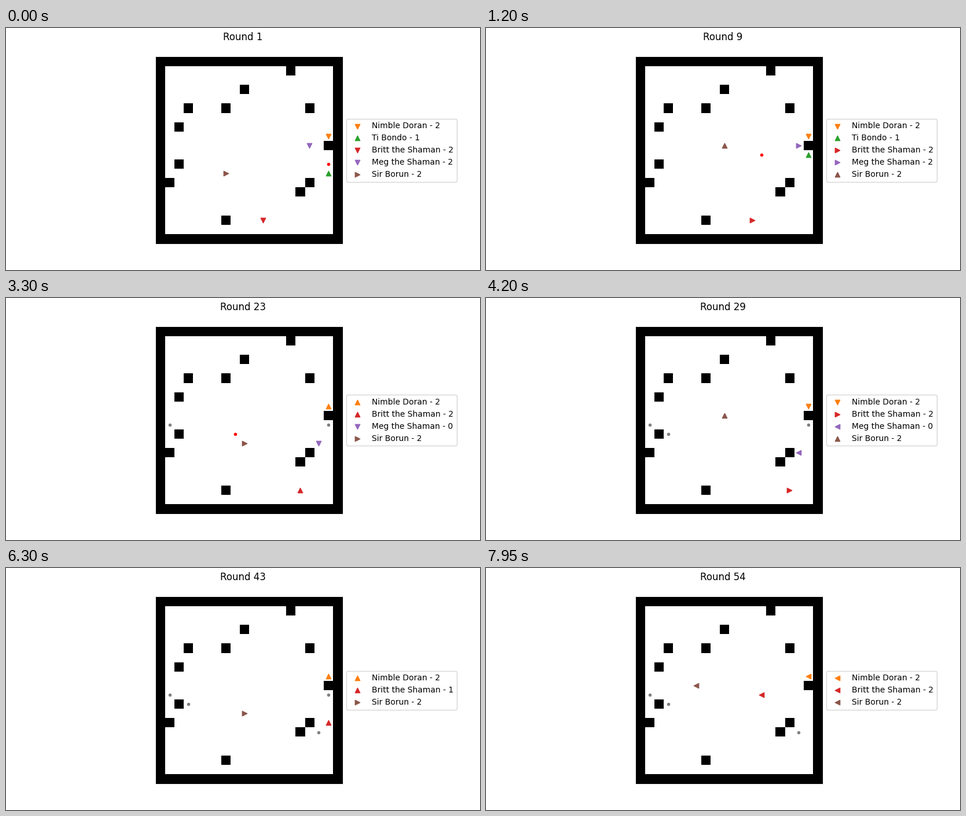
Animation, 819 px wide and 418 px high, one loop 8000 ms. Source, as a matplotlib script:

```python
import matplotlib.pyplot as plt
import numpy as np
from matplotlib.animation import FuncAnimation
from matplotlib.patches import RegularPolygon

SIZE, ROUNDS = 20, 54
FRAMES, INTERVAL, FRAMES_PER_ROUND = 160, 50, 3
SCAN_RADIUS = 4

# Headings run clockwise: up, right, down, left.
UP, RIGHT, DOWN, LEFT = range(4)
STEPS = [(0, -1), (1, 0), (0, 1), (-1, 0)]
MARKERS = "^>v<"

BLOCKS = [(14, 1), (9, 3), (3, 5), (7, 5), (16, 5), (2, 7), (18, 9),
          (2, 11), (1, 13), (16, 13), (15, 14), (7, 17)]

# Actions: F forward, R / L turn, S shoot, C scan circle, "." wait.
LOOK_AND_STEP = "RRRRF"
WANDERER = "FFRRRSR"
SHAMAN_1 = ("RRRF" + LOOK_AND_STEP * 5 + "RRRSRF" + "RRR" + "F" * 7
            + "RRR" + "F" * 5)
SHAMAN_2 = ("RRRF" + "RRRRR" + "F" + "RRRSR" + "F" + "RSRRR" + "F"
            + LOOK_AND_STEP * 2 + "R")


def patrol(rnd):
    if rnd % 5 == 0:
        return "L"
    return "C" if rnd % 4 == 0 else "F"


def plan(actions):
    return lambda rnd: actions[rnd - 2] if rnd - 2 < len(actions) else "."


def make_players():
    rows = [
        ("Nimble Doran", "C1", (18, 8), DOWN, 2, lambda rnd: "R"),
        ("Ti Bondo", "C2", (18, 12), UP, 1, plan(WANDERER)),
        ("Britt the Shaman", "C3", (11, 17), DOWN, 2, plan(SHAMAN_1)),
        ("Meg the Shaman", "C4", (16, 9), DOWN, 2, plan(SHAMAN_2)),
        ("Sir Borun", "C5", (7, 12), RIGHT, 2, patrol),
    ]
    keys = ("name", "color", "pos", "heading", "arrows", "act")
    return [dict(zip(keys, row), scan=False) for row in rows]


walls = np.ones((SIZE, SIZE))
walls[1:-1, 1:-1] = 0
for col, row in BLOCKS:
    walls[row, col] = 1


def ahead(pos, heading):
    dx, dy = STEPS[heading]
    return pos[0] + dx, pos[1] + dy


def is_wall(pos):
    return walls[pos[1], pos[0]] == 1


def simulate():
    """Return (players, flying arrows, grounded arrows) for every round."""
    players = make_players()
    flying, ground = [((18, 11), UP)], []
    history = []

    def hit(pos):
        victims = [p for p in players if p["pos"] == pos]
        for victim in victims:
            players.remove(victim)
        return bool(victims)

    def fly(pos, heading):
        for _ in range(2):
            target = ahead(pos, heading)
            if is_wall(target):
                ground.append(pos)
                return
            pos = target
            if hit(pos):
                ground.append(pos)
                return
        flying.append((pos, heading))

    def shoot(player):
        player["arrows"] -= 1
        pos = ahead(player["pos"], player["heading"])
        if hit(pos):
            ground.append(pos)
        else:
            flying.append((pos, player["heading"]))

    def step(player):
        target = ahead(player["pos"], player["heading"])
        if is_wall(target):
            return
        player["pos"] = target
        if target in ground:
            ground.remove(target)
            player["arrows"] += 1

    for rnd in range(1, ROUNDS + 1):
        if rnd > 1:
            airborne, flying[:] = flying[:], []
            for arrow in airborne:
                fly(*arrow)
            for player in players[:]:
                action = player["act"](rnd)
                player["scan"] = action == "C"
                if action == "F":
                    step(player)
                elif action == "S":
                    shoot(player)
                elif action in "RL":
                    turn = 1 if action == "R" else -1
                    player["heading"] = (player["heading"] + turn) % 4
        history.append(([dict(p) for p in players],
                        [pos for pos, _ in flying], ground[:]))
    return history


history = simulate()

# The tiny excess keeps the pixel size from being truncated downwards.
fig, ax = plt.subplots(figsize=(8.190001, 4.180001), dpi=100)
ax.imshow(walls, cmap="binary")
ax.set(xticks=[], yticks=[])
ax.autoscale(False)
title = fig.suptitle("", y=0.9824)
drawn = []


def draw_round(frame):
    while drawn:
        drawn.pop().remove()
    rnd = frame // FRAMES_PER_ROUND
    players, flying, ground = history[rnd]
    title.set_text(f"Round {rnd + 1}")

    for arrows, color in ((ground, "gray"), (flying, "red")):
        for pos in arrows:
            drawn.append(ax.scatter(*pos, color=color, marker="."))
    for p in players:
        drawn.append(ax.scatter(*p["pos"], color=p["color"],
                                marker=MARKERS[p["heading"]],
                                label=f"{p['name']} - {p['arrows']}"))
        if p["scan"]:
            circle = RegularPolygon(p["pos"], 20, radius=SCAN_RADIUS,
                                    color=p["color"], alpha=0.15)
            drawn.append(ax.add_patch(circle))
    drawn.append(ax.legend(loc="center left", bbox_to_anchor=(1, 0.5)))


animation = FuncAnimation(fig, draw_round, frames=FRAMES, interval=INTERVAL,
                          init_func=lambda: draw_round(0), repeat=True,
                          repeat_delay=0)
plt.show()
```
